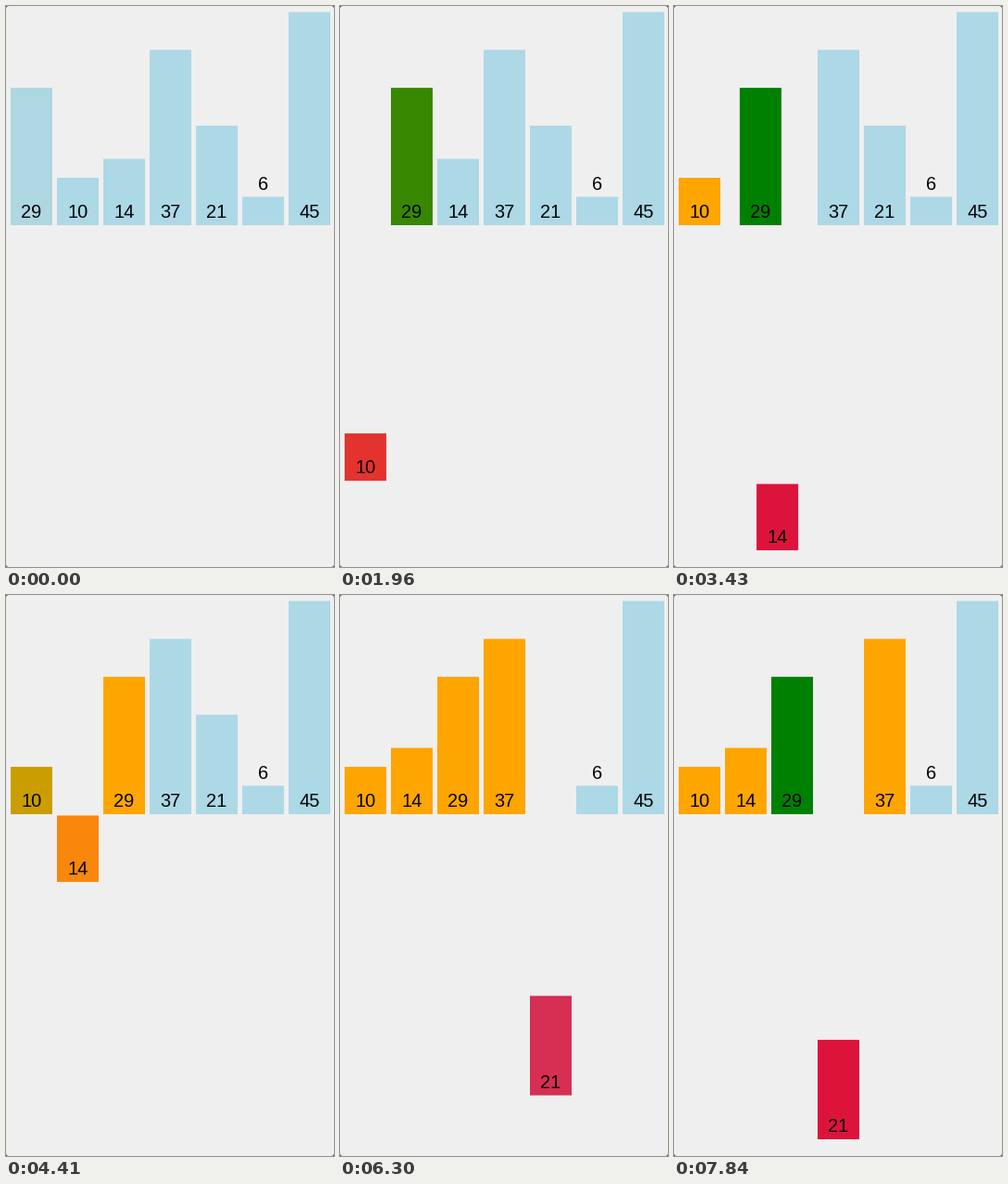
A matplotlib script that plays this animation: 354 by 604 pixels, repeating every 8 s.

```python
import numpy as np
import matplotlib.pyplot as plt
from matplotlib.animation import FuncAnimation
from matplotlib.colors import to_rgb
from matplotlib.patches import FancyBboxPatch, Rectangle

W, H, DPI = 354, 604, 100
LOOP, INTERVAL = 8000, 20
TICK = 70              # the picture refreshes every 70 ms
EASE_MS = 300
BASE, UNIT, DROP = 236, 5.1, 350
BAR_W, PITCH, LEFT = 45, 50, 5

VALUES = [29, 10, 14, 37, 21, 6, 45]
IDLE, SORTED, KEY, COMPARE = "lightblue", "orange", "crimson", "green"


def paint(value, colour):
    return value, 2, to_rgb(colour)


def move(value, slot):
    return value, 0, slot


def lift(value):
    return [(value, 1, 1), paint(value, KEY)]


def place(value):
    return [(value, 1, 0), paint(value, SORTED)]


# insertion sort: start time in ms, then the changes eased in from there
STEPS = [
    (-53, [paint(29, SORTED)]),
    (422, lift(10)),
    (897, [paint(29, COMPARE)]),
    (1372, [move(29, 1), move(10, 0)]),
    (1847, place(10) + [paint(29, SORTED)]),
    (2322, lift(14)),
    (2797, [paint(29, COMPARE)]),
    (3301, [move(29, 2), move(14, 1)]),
    (3757, [paint(29, SORTED), paint(10, COMPARE)]),
    (4222, place(14) + [paint(10, SORTED)]),
    (4697, lift(37)),
    (5172, [paint(29, COMPARE)]),
    (5640, place(37) + [paint(29, SORTED)]),
    (6097, lift(21)),
    (6587, [paint(37, COMPARE)]),
    (7072, [move(37, 4), move(21, 3)]),
    (7555, [paint(37, SORTED), paint(29, COMPARE)]),
]


def ease(t):
    """Cubic in-out."""
    t = min(max(t, 0), 1)
    return 4 * t**3 if t < 0.5 else 1 - 4 * (1 - t)**3


def state_at(ms):
    """Slot, drop share and colour of every bar."""
    state = {v: [i, 0, np.array(to_rgb(IDLE))] for i, v in enumerate(VALUES)}
    for start, changes in STEPS:
        p = ease((ms - start) / EASE_MS)
        if p == 0:
            break
        for value, key, goal in changes:
            now = state[value][key]
            state[value][key] = now + p * (np.array(goal) - now)
    return state


fig = plt.figure(figsize=(W / DPI, H / DPI), dpi=DPI, facecolor="#505050")
ax = fig.add_axes([0, 0, 1, 1])
ax.set(xlim=(0, W), ylim=(H, 0))
ax.axis("off")
ax.add_patch(FancyBboxPatch((0, 0), W, H, lw=0, fc="#efefef",
                            boxstyle="round,pad=0,rounding_size=3"))

bars, labels = {}, {}
for v in VALUES:
    bars[v] = ax.add_patch(Rectangle((0, 0), BAR_W, v * UNIT, lw=0, snap=False))
    labels[v] = ax.text(0, 0, str(v), ha="center", va="baseline", color="black",
                        family="Liberation Sans", size=20 * 72 / DPI)


def draw(n):
    tick = min((n * INTERVAL + INTERVAL // 2) // TICK, LOOP // TICK - 2)
    for v, (slot, drop, colour) in state_at(tick * TICK).items():
        x, foot = LEFT + PITCH * slot, BASE + DROP * drop
        top = foot - v * UNIT
        bars[v].set_xy((x, top))
        bars[v].set_facecolor(colour)
        # short bars carry their number on top
        text_y = foot - 8 if v * UNIT > 40 else top - 7.4
        labels[v].set_position((x + BAR_W / 2, text_y))
    return [*bars.values(), *labels.values()]


anim = FuncAnimation(fig, draw, frames=LOOP // INTERVAL, interval=INTERVAL,
                     repeat=True, repeat_delay=0, blit=False)
plt.show()
```
